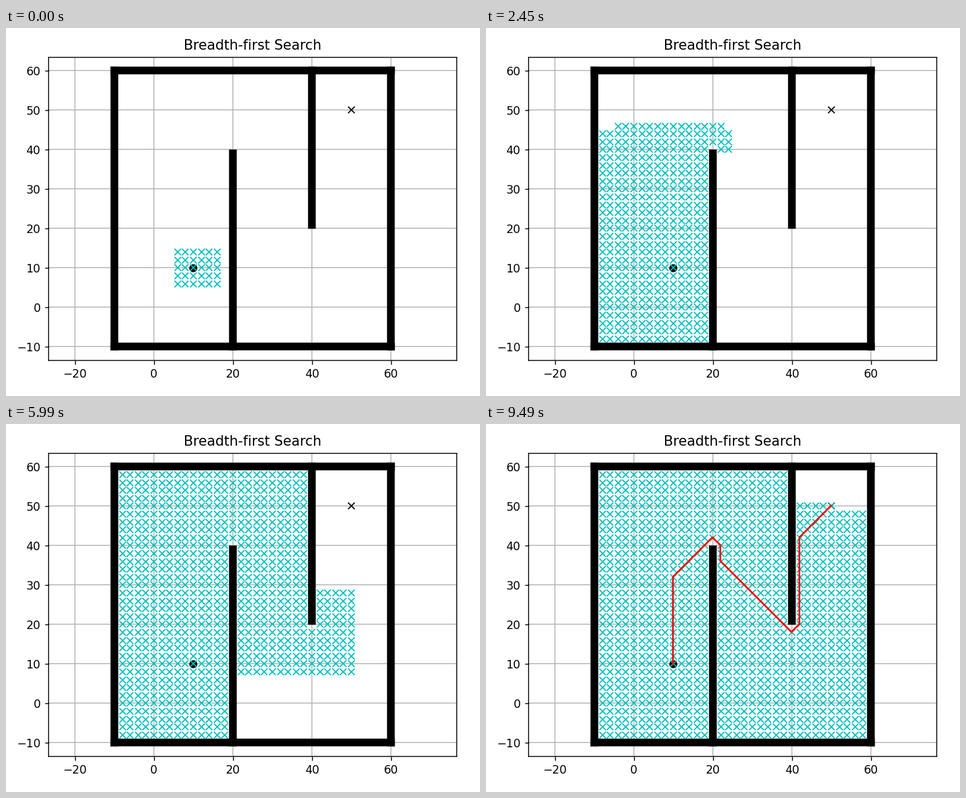
Animation of 720x560 px, one loop 9950 ms. Source, as a matplotlib script:

```python
from itertools import product

import matplotlib.pyplot as plt
import numpy as np
from matplotlib.animation import FuncAnimation

W, H, DPI = 720, 560, 125
LOOP, TICK = 9950, 25
SLOT = LOOP / 147          # the picture refreshes at this pace, in ms
BASE, GROWTH = 49.8, 0.385  # batch n is ready after n * (BASE + GROWTH * n) ms
FIRST, BATCH, BATCHES = 30, 10, 105

CELL, RADIUS = 2, 1
START, GOAL = (10, 10), (50, 50)
LOW, HIGH = -10, 60
MOVES = [(1, 0), (0, 1), (-1, 0), (0, -1), (-1, -1), (-1, 1), (1, -1), (1, 1)]
WALLS = [(LOW, LOW, HIGH, LOW), (HIGH, LOW, HIGH, HIGH),
         (LOW, HIGH, HIGH, HIGH), (LOW, LOW, LOW, HIGH),
         (20, LOW, 20, 39), (40, 21, 40, HIGH)]

# The chart lives on a coarse pixel grid that is shown enlarged
ZOOM, CROP_X, CROP_Y = 1.25, 36, 28.5
LEFT, RIGHT, TOP, BOTTOM = 80.5, 576.5, 58.5, 427.5
ARM, HALF_WALL = 4, 4.69


def to_px(points):
    x, y = np.asarray(points, float).T
    return np.column_stack([208 + 4.8 * x, 362.4 - 4.8 * y])


def snap(points):
    return np.floor(to_px(points) + 0.5) + 0.5


def crosses(points):
    arms = np.array([(-1, -1), (1, 1), (np.nan, np.nan),
                     (-1, 1), (1, -1), (np.nan, np.nan)]) * ARM
    return (snap(points)[:, None] + arms).reshape(-1, 2)


def search():
    """Breadth-first search; returns visited cells in order and the path."""
    blocks = np.array([p for x0, y0, x1, y1 in WALLS
                       for p in product(range(x0, x1 + 1), range(y0, y1 + 1))])

    def is_free(cell):
        inside = all(LOW <= c < HIGH for c in cell)
        return inside and np.hypot(*(blocks - cell).T).min() > RADIUS

    parent, checked, queue = {START: None}, {}, [START]
    for n, cell in enumerate(queue):
        if cell == GOAL:
            break
        for dx, dy in MOVES:
            nxt = (cell[0] + dx * CELL, cell[1] + dy * CELL)
            if nxt not in checked:
                checked[nxt] = is_free(nxt)
            if checked[nxt] and nxt not in parent:
                parent[nxt] = cell
                queue.append(nxt)
    path, cell = [], GOAL
    while cell:
        path.append(cell)
        cell = parent[cell]
    return queue[:n + 1], path


visited, path = search()
marks, trail = crosses(visited), to_px(path)

plt.rcParams.update({"path.snap": False, "path.simplify": False})
fig = plt.figure(figsize=(W / DPI, H / DPI), dpi=DPI, facecolor="white")
ax = fig.add_axes([(LEFT * ZOOM - CROP_X) / W,
                   1 - (BOTTOM * ZOOM - CROP_Y) / H,
                   (RIGHT - LEFT) * ZOOM / W, (BOTTOM - TOP) * ZOOM / H])
ax.set_xlim(LEFT, RIGHT)
ax.set_ylim(BOTTOM, TOP)
for values, col, set_ticks in [(range(-20, 61, 20), 0, ax.set_xticks),
                               (range(-10, 61, 10), 1, ax.set_yticks)]:
    labels = [str(v).replace("-", "\N{MINUS SIGN}") for v in values]
    set_ticks(snap([(v, v) for v in values])[:, col], labels)
ax.grid(True)
ax.set_title("Breadth-first Search", pad=6.6)

for x0, y0, x1, y1 in WALLS:
    (left, low), (right, high) = snap([(x0, y0), (x1, y1)])
    ax.add_patch(plt.Rectangle(
        (left - HALF_WALL, high - HALF_WALL),
        right - left + 2 * HALF_WALL, low - high + 2 * HALF_WALL,
        facecolor="black", edgecolor="none", zorder=2))
ax.plot(*to_px([START]).T, "ok")
ax.plot(*crosses([GOAL]).T, "k", lw=1, solid_capstyle="butt")
cells, = ax.plot([], [], "c", lw=1, solid_capstyle="butt")
route, = ax.plot([], [], "r")


def draw(i):
    t = (i * TICK + TICK - 1) // SLOT * SLOT
    n = int((np.sqrt(BASE ** 2 + 4 * GROWTH * t) - BASE) / (2 * GROWTH))
    done = n >= BATCHES
    count = len(visited) if done else FIRST + BATCH * n
    cells.set_data(*marks[:6 * count].T)
    route.set_data(*(trail.T if done else ([], [])))
    return cells, route


anim = FuncAnimation(fig, draw, frames=LOOP // TICK, interval=TICK,
                     init_func=lambda: draw(0), repeat=True, repeat_delay=0)
plt.show()
```
